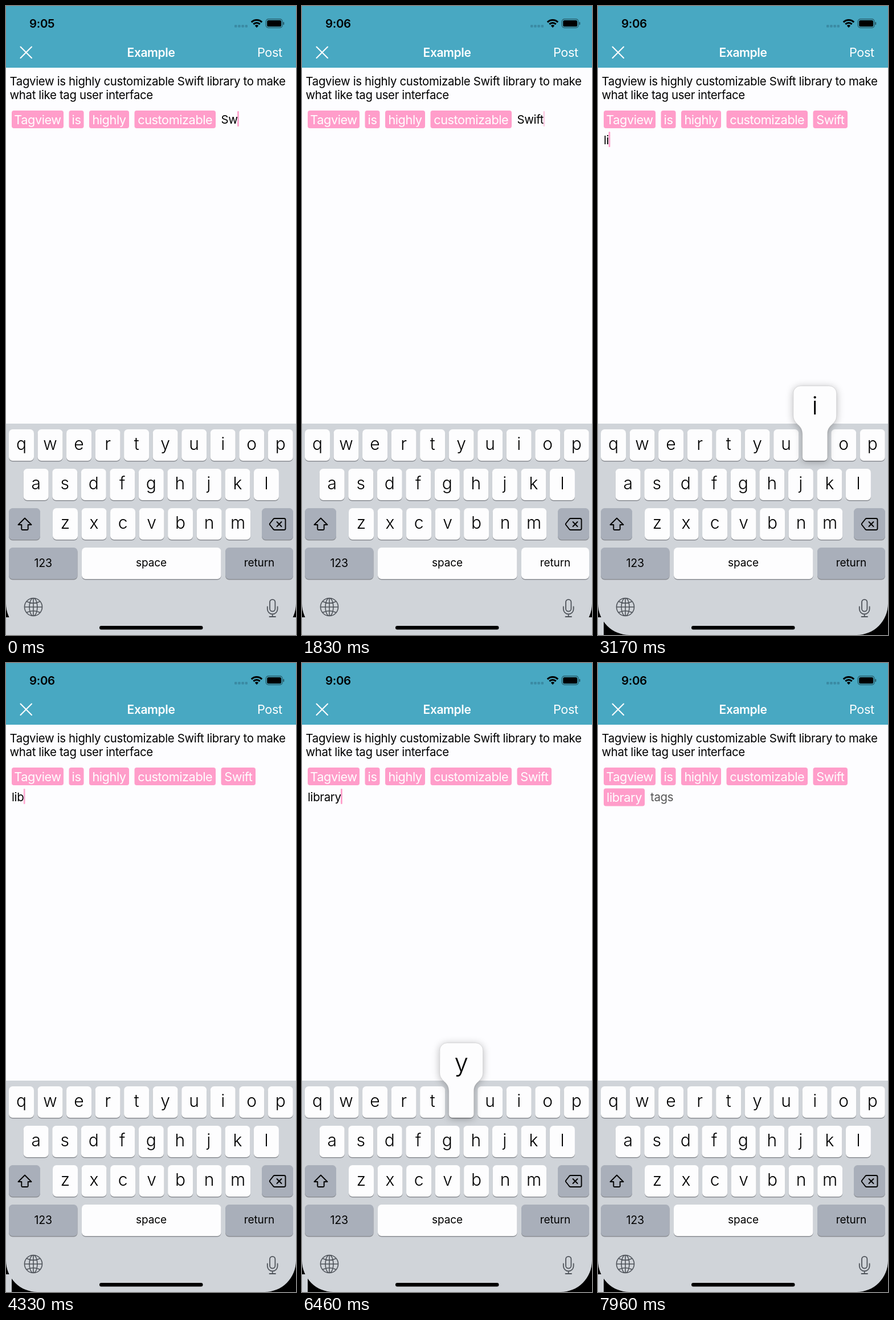
An HTML page with a canvas for the animation above (8000 ms loop, 509 by 1101 pixels).

```html
<!DOCTYPE html>
<html lang="en">
<head>
<meta charset="utf-8">
<title>Tag input</title>
<style>
  html, body { margin: 0; width: 100%; height: 100%; overflow: hidden; background: #fdfdff; }
  canvas { display: block; width: 509px; height: 1101px; }
</style>
</head>
<body>
<canvas id="stage"></canvas>
<script>
const W = 509, H = 1101, LOOP = 8000;
const TEAL = '#48a8c2', PAGE = '#fdfdff', PINK = '#ff9dca';
const BOARD = '#d0d4d9', KEY = '#fdfdfe', KEY_DARK = '#a9afba', KEY_EDGE = '#8b8e93';
const canvas = document.getElementById('stage');
const ctx = canvas.getContext('2d');
const dpr = window.devicePixelRatio || 1;
canvas.width = W * dpr;
canvas.height = H * dpr;

// Each stroke: caret fade start, moment of input, end of key popup.
const strokes = [
  { key: 'i', fade: 40, at: 250, end: 330 },
  { key: 'f', fade: 710, at: 960, end: 1040 },
  { key: 't', fade: 1200, at: 1250, end: 1330 },
  { key: 'return', fade: 1670, at: 2000, end: 2040 },
  { key: 'l', fade: 2380, at: 2590, end: 2670 },
  { key: 'i', fade: 3000, at: 3170, end: 3630 },
  { key: 'b', fade: 3630, at: 3880, end: 3960 },
  { key: 'r', fade: 4330, at: 4500, end: 4960 },
  { key: 'a', fade: 4960, at: 5210, end: 5290 },
  { key: 'r', fade: 5580, at: 5870, end: 5960 },
  { key: 'y', fade: 6290, at: 6460, end: 6880 },
  { key: 'return', fade: 6880, at: 7210, end: 7250 }
];
const LAST_FADE = 7670, STEP = 41, FADE_STEPS = 8;

const tags = [
  { text: 'Tagview', x: 10, y: 183, w: 91 },
  { text: 'is', x: 110.5, y: 183, w: 26 },
  { text: 'highly', x: 146, y: 183, w: 70 },
  { text: 'customizable', x: 225.5, y: 183, w: 142.5 },
  { text: 'Swift', x: 377.5, y: 183, w: 60.5 },
  { text: 'library', x: 10, y: 219.5, w: 72 }
];
const inputSpots = [[377.5, 205.5], [10, 241.5], [92, 241.5]];

const letterKeys = [['qwertyuiop', 5, 741], ['asdfghjkl', 30.7, 810], ['zxcvbnm', 82, 879]]
  .flatMap(([row, x, y]) => [...row].map((key, i) => ({ key, x: x + i * 50.53, y, w: 44 })));

function box(x, y, w, h, r, color) {
  ctx.fillStyle = color;
  ctx.beginPath();
  ctx.roundRect(x, y, w, h, r);
  ctx.fill();
}

function text(str, x, y, size, { color = '#000', weight = 400, align = 'left', track = 0 } = {}) {
  ctx.font = `${weight} ${size}px Inter, sans-serif`;
  ctx.letterSpacing = track + 'px';
  ctx.textAlign = align;
  ctx.fillStyle = color;
  ctx.fillText(str, x, y);
  return ctx.measureText(str).width;
}

function strokePath(d, color, width) {
  ctx.strokeStyle = color;
  ctx.lineWidth = width;
  ctx.lineCap = ctx.lineJoin = 'round';
  ctx.stroke(new Path2D(d));
}

function stateAt(t) {
  const state = { word: 'Sw', done: 0, popup: null, returning: false };
  for (const s of strokes) {
    const isReturn = s.key === 'return';
    if (t >= s.at) {
      state.word = isReturn ? '' : state.word + s.key;
      if (isReturn) state.done++;
    }
    if (isReturn && t >= s.fade + 140 && t < s.end) state.returning = true;
    if (!isReturn && t >= s.at - 40 && t < s.end) state.popup = s.key;
  }
  const next = strokes.find(s => s.at > t);
  const fade = next ? next.fade : LAST_FADE;
  const steps = t < fade ? 0 : Math.floor((t - fade) / STEP) + 1;
  state.caret = Math.max(0, 1 - steps / FADE_STEPS);
  return state;
}

function drawStatusIcons() {
  for (let i = 0; i < 4; i++) box(401 + i * 6.2, 33, 4.4, 4.4, 1.2, '#3a8aa3');

  ctx.save();
  ctx.strokeStyle = ctx.fillStyle = '#000';
  ctx.lineWidth = 3.2;
  ctx.lineCap = 'butt';
  for (const r of [13, 8]) {
    ctx.beginPath();
    ctx.arc(440, 37.5, r, -Math.PI * 0.75, -Math.PI * 0.25);
    ctx.stroke();
  }
  ctx.beginPath();
  ctx.moveTo(440, 38);
  ctx.arc(440, 37.5, 4.4, -Math.PI * 0.75, -Math.PI * 0.25);
  ctx.fill();
  ctx.restore();

  ctx.strokeStyle = 'rgba(0,0,0,.45)';
  ctx.lineWidth = 1.3;
  ctx.beginPath();
  ctx.roundRect(456.2, 23, 29, 15, 4.4);
  ctx.stroke();
  box(458.2, 25, 25, 11, 2.6, '#000');
  box(486.4, 28, 1.8, 5, 1, 'rgba(0,0,0,.5)');
}

function drawHeader(t) {
  ctx.fillStyle = TEAL;
  ctx.fillRect(0, 0, W, 108);
  text(t < 1670 ? '9:05' : '9:06', 41, 38, 20.36, { weight: 600, track: -0.3 });
  drawStatusIcons();
  strokePath('M25.5 71.5 45 91M45 71.5 25.5 91', '#fff', 2.1);
  text('Example', 254.5, 88.5, 21, { color: '#fff', weight: 600, align: 'center', track: -0.4 });
  text('Post', 441, 88.5, 21.7, { color: '#fff', track: -0.4 });
}

function drawContent(state) {
  const body = { track: -0.33 };
  text('Tagview is highly customizable Swift library to make', 6.5, 138.5, 20.36, body);
  text('what like tag user interface', 6.5, 163, 20.36, body);

  for (const tag of tags.slice(0, 4 + state.done)) {
    box(tag.x, tag.y, tag.w, 31, 4, PINK);
    text(tag.text, tag.x + tag.w / 2, tag.y + 23.5, 21.7, { color: '#fff', align: 'center', track: -0.42 });
  }

  const [x, y] = inputSpots[state.done];
  let caretX = x;
  if (state.word) caretX += text(state.word, x, y, 20.36, body);
  else text('tags', x, y, 20.36, { color: '#555', track: -0.33 });
  ctx.globalAlpha = state.caret;
  box(caretX - 0.5, y - 21.5, 2.7, 27, 1.2, PINK);
  ctx.globalAlpha = 1;
}

function drawKey(x, y, w, color) {
  box(x, y + 1.5, w, 55, 6.5, KEY_EDGE);
  box(x, y, w, 55, 6.5, color);
}

function drawPopup({ key, x, y, w }) {
  const left = x - 16, right = x + w + 16, top = y - 76, foot = y + 55;
  ctx.beginPath();
  ctx.moveTo(left, top + 13);
  ctx.arcTo(left, top, left + 13, top, 13);
  ctx.arcTo(right, top, right, top + 13, 13);
  ctx.lineTo(right, y - 24);
  ctx.bezierCurveTo(right, y - 8, x + w, y - 9, x + w, y + 8);
  ctx.arcTo(x + w, foot, x + w - 6, foot, 6);
  ctx.arcTo(x, foot, x, foot - 6, 6);
  ctx.lineTo(x, y + 8);
  ctx.bezierCurveTo(x, y - 9, left, y - 8, left, y - 24);
  ctx.closePath();
  ctx.save();
  ctx.shadowColor = 'rgba(0,0,0,.28)';
  ctx.shadowBlur = 14 * dpr;
  ctx.shadowOffsetY = 2 * dpr;
  ctx.fillStyle = KEY;
  ctx.fill();
  ctx.restore();
  ctx.strokeStyle = 'rgba(0,0,0,.14)';
  ctx.lineWidth = 0.8;
  ctx.stroke();
  text(key, x + w / 2, y - 26, 44, { weight: 300, align: 'center' });
}

function drawKeyboard(state) {
  ctx.fillStyle = BOARD;
  ctx.fillRect(0, 731, W, H - 731);

  for (const k of letterKeys) {
    drawKey(k.x, k.y, k.w, KEY);
    if (k.key !== state.popup) text(k.key, k.x + k.w / 2, k.y + 35.5, 30, { weight: 300, align: 'center' });
  }

  drawKey(5, 879, 55, KEY_DARK);
  strokePath('M33 896.5 44.5 908H38.7V915.5Q38.7 917 37.2 917H28.8Q27.3 917 27.3 915.5V908H21.5Z', '#000', 1.9);
  drawKey(449, 879, 55, KEY_DARK);
  strokePath('M471.5 897H488Q490.5 897 490.5 899.5V914.5Q490.5 917 488 917H471.5Q470.3 917 469.3 916L463 908Q462.4 907 463 906L469.3 898Q470.3 897 471.5 897Z', '#000', 1.9);
  strokePath('M475.5 903 483.5 911M483.5 903 475.5 911', '#000', 1.9);

  const label = { align: 'center', track: -0.1 };
  drawKey(5, 948, 120.5, KEY_DARK);
  text('123', 65.2, 982, 19.5, label);
  drawKey(133, 948, 244.5, KEY);
  text('space', 255, 980.5, 19, label);
  drawKey(385, 948, 119, state.returning ? KEY : KEY_DARK);
  text('return', 444.5, 980.5, 19, label);

  const ink = '#4f545b';
  strokePath('M32.5 1052a15.5 15.5 0 1 0 31 0a15.5 15.5 0 1 0 -31 0M41 1052a7 15.5 0 1 0 14 0a7 15.5 0 1 0 -14 0' +
    'M48 1036.5V1067.5M32.5 1052H63.5M36.5 1042.5Q48 1048 59.5 1042.5M36.5 1061.5Q48 1056 59.5 1061.5', ink, 1.6);
  strokePath('M463 1043.5a4.7 4.7 0 0 1 9.4 0V1055a4.7 4.7 0 0 1 -9.4 0Z' +
    'M458.8 1051.5V1055.5a8.9 8.9 0 0 0 17.8 0V1051.5M467.7 1064.5V1069M462.5 1069H473', ink, 1.8);
}

function drawCorners(full) {
  const r = 55, cy = H - r;
  ctx.save();
  ctx.beginPath();
  ctx.rect(0, cy, W, 1070 - cy);
  if (full) ctx.rect(10, 1070, W - 10, H - 1070);
  ctx.clip();
  ctx.fillStyle = '#000';
  ctx.beginPath();
  ctx.moveTo(0, cy);
  ctx.arc(r, cy, r, Math.PI, Math.PI / 2, true);
  ctx.lineTo(0, H);
  ctx.closePath();
  ctx.moveTo(W, cy);
  ctx.arc(W - r, cy, r, 0, Math.PI / 2);
  ctx.lineTo(W, H);
  ctx.closePath();
  ctx.fill();
  ctx.restore();
  box(164, 1085, 181.5, 6.5, 3.2, '#000');
}

function draw(t) {
  const state = stateAt(t);
  ctx.setTransform(dpr, 0, 0, dpr, 0, 0);
  ctx.fillStyle = PAGE;
  ctx.fillRect(0, 0, W, H);
  drawHeader(t);
  drawContent(state);
  drawKeyboard(state);
  drawCorners(state.done > 0);
  if (state.popup) drawPopup(letterKeys.find(k => k.key === state.popup));
}

const start = performance.now();
function frame() {
  draw((performance.now() - start) % LOOP);
  requestAnimationFrame(frame);
}
frame();
</script>
</body>
</html>
```
